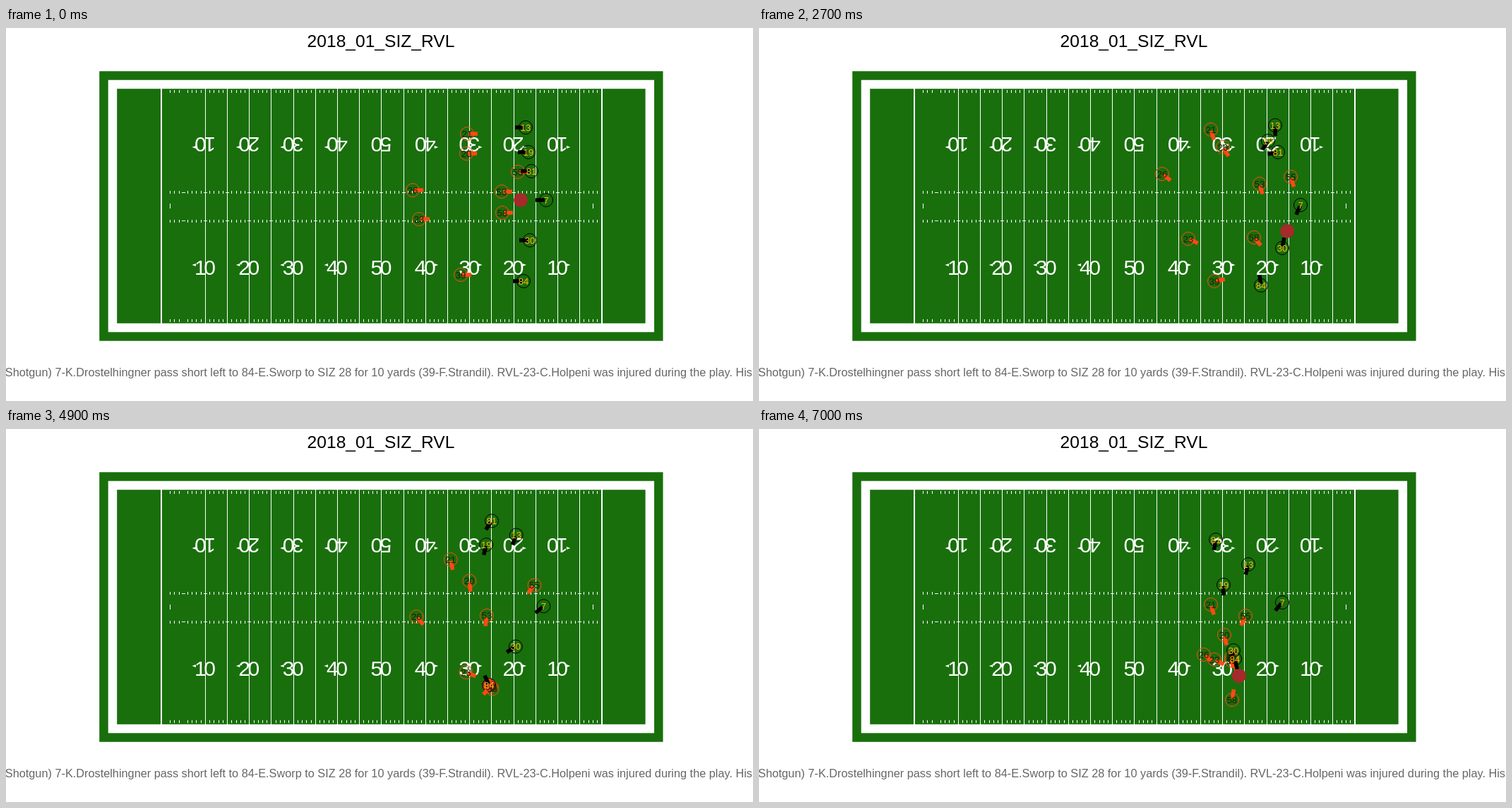
An HTML page with a canvas that plays this animation: 1058 by 529 pixels, repeating every 7100 ms.

```html
<!DOCTYPE html>
<html lang="en">
<head>
<meta charset="utf-8">
<title>Play animation</title>
<style>
  html, body { margin: 0; width: 100%; height: 100%; overflow: hidden; background: #fff; }
  canvas { display: block; width: 100vw; height: 100vh; }
</style>
</head>
<body>
<canvas id="stage" width="1058" height="529"></canvas>
<script>
const ctx = document.getElementById('stage').getContext('2d');
const LOOP = 7100, STEP = 100;
const SNAP = 1000, CAUGHT_SNAP = 1600, THROW = 2300, CATCH = 3500, DOWN = 5700;
const KEYS = [SNAP, 2700, 4400, 7000];
const YARD = 6.2367, LEFT = 157.2, TOP = 86.2, RIGHT = 905.6, BOTTOM = 418.8;
const FONT = 'Arial, "Liberation Sans", sans-serif';
const GREEN = '#196f0c';
const AWAY = { line: '#000', ink: '#ffb612', ahead: -1 };
const HOME = { line: '#ff4a12', ink: '#2a1c00', ahead: 1 };

const fieldX = yd => LEFT + yd * YARD;
const mix = (a, b, k) => a.map((v, i) => v + (b[i] - v) * k);
const ramp = (t, t0, t1) => Math.min(1, Math.max(0, (t - t0) / (t1 - t0)));

// Smooth curve through points at uneven times, starting from rest.
function curve(ts, vs) {
  const last = ts.length - 1;
  const slope = vs.map((v, i) => {
    const a = Math.max(0, i - 1), b = Math.min(last, i + 1);
    return i ? (vs[b] - vs[a]) / (ts[b] - ts[a]) : 0;
  });
  return t => {
    if (t <= ts[0]) return vs[0];
    if (t >= ts[last]) return vs[last];
    const i = ts.findIndex((v, k) => t < ts[k + 1]);
    const d = ts[i + 1] - ts[i], u = (t - ts[i]) / d, w = 1 - u;
    return w * w * ((1 + 2 * u) * vs[i] + u * d * slope[i]) +
           u * u * ((3 - 2 * u) * vs[i + 1] - w * d * slope[i + 1]);
  };
}

// A route: lined up, at the throw, after the catch, at the whistle.
function player(num, team, ...route) {
  const x = curve(KEYS, route.map(p => p[0]));
  const y = curve(KEYS, route.map(p => p[1]));
  return { num, team, at: t => [x(t), y(t)] };
}

const passer = player('7', AWAY, [765, 244], [767, 251], [765, 252], [741, 246]);
const catcher = player('84', AWAY, [733, 359], [711, 365], [688, 369], [674, 326]);
const players = [
  player('21', HOME, [653, 150], [640, 144], [629, 172], [640, 249]),
  player('20', HOME, [652, 178], [657, 169], [656, 200], [659, 292]),
  player('26', HOME, [576, 230], [571, 207], [573, 253], [630, 320]),
  player('23', HOME, [585, 271], [608, 299], [649, 344], [645, 327]),
  player('39', HOME, [644, 350], [645, 359], [688, 374], [669, 328]),
  player('53', HOME, [702, 232], [709, 221], [685, 252], [669, 324]),
  player('55', HOME, [725, 204], [753, 211], [758, 214], [689, 265]),
  player('58', HOME, [703, 262], [701, 297], [690, 357], [670, 384]),
  player('13', AWAY, [736, 141], [731, 138], [728, 143], [693, 192]),
  player('19', AWAY, [740, 176], [721, 160], [687, 155], [658, 221]),
  player('81', AWAY, [744, 203], [735, 176], [698, 130], [647, 157]),
  passer,
  player('30', AWAY, [742, 301], [741, 312], [731, 308], [672, 314]),
  catcher
];

// Snapped, held, thrown, carried, then left on the ground.
function ballAt(t) {
  if (t < THROW) return mix([729, 244], passer.at(t), ramp(t, SNAP, CAUGHT_SNAP));
  return mix(passer.at(THROW), catcher.at(Math.min(t, DOWN)), ramp(t, THROW, CATCH));
}

// Players line up facing ahead, then turn to the ball and the way they run.
function facing(p, t) {
  const here = p.at(t), ball = ballAt(t);
  const before = p.at(t - STEP), after = p.at(t + STEP);
  const dist = Math.hypot(ball[0] - here[0], ball[1] - here[1]);
  const pull = 5 / Math.max(dist, 20);
  const look = here.map((v, i) => after[i] - before[i] + (ball[i] - v) * pull);
  const [dx, dy] = mix([p.team.ahead * 6, 0], look, ramp(t, SNAP, 2500));
  return Math.atan2(dy, dx);
}

function box(color, x0, y0, x1, y1) {
  ctx.fillStyle = color;
  ctx.fillRect(x0, y0, x1 - x0, y1 - y0);
}

// The field grown by a margin in yards.
function apron(color, yards) {
  const m = yards * YARD;
  box(color, LEFT - m, TOP - m, RIGHT + m, BOTTOM + m);
}

function text(str, x, y, size, color, align = 'center') {
  ctx.font = `${size}px ${FONT}`;
  ctx.textAlign = align;
  ctx.fillStyle = color;
  ctx.fillText(str, x, y);
}

function disc([x, y], r) {
  ctx.beginPath();
  ctx.arc(x, y, r, 0, Math.PI * 2);
}

function vline(yd, y0, y1) {
  const x = Math.round(fieldX(yd));
  box('#fff', x, y0, x + 1, y1);
}

function yardNumber(yd, y, turned) {
  const digits = String(50 - Math.abs(yd - 60));
  const side = Math.sign(yd - 60) * (turned ? -1 : 1);
  ctx.save();
  ctx.translate(fieldX(yd), y);
  if (turned) ctx.rotate(Math.PI);
  text(digits[0], -6.6, 10.8, 30, '#fff');
  text(digits[1], 6.6, 10.8, 30, '#fff');
  if (side) {
    ctx.beginPath();
    ctx.moveTo(side * 18.5, -3);
    ctx.lineTo(side * 13, -5);
    ctx.lineTo(side * 13, -1);
    ctx.fill();
  }
  ctx.restore();
}

function drawField() {
  box('#fff', 0, 0, 1058, 529);
  apron(GREEN, 4);
  apron('#fff', 2);
  apron(GREEN, 0);
  for (let yd = 20; yd <= 105; yd += 5) vline(yd, 86, 419);
  for (const yd of [10, 110]) {
    const x = Math.floor(fieldX(yd));
    box('#fff', x, 86, x + 2, 419);
  }
  for (const yd of [12, 108]) vline(yd, 249, 256);
  for (let yd = 12; yd < 110; yd++) {
    const x = Math.round(fieldX(yd));
    if (yd % 5) {
      for (const y of [88, 231, 272, 413]) vline(yd, y, y + 4);
    } else {
      for (const y of [233, 273]) box('#fff', x - 2, y, x + 3, y + 1);
    }
  }
  for (let yd = 20; yd <= 100; yd += 10) {
    yardNumber(yd, 339, false);
    yardNumber(yd, 166, true);
  }
  text('2018_01_SIZ_RVL', 531, 27, 24.6, '#000');
  text('(Shotgun) 7-K.Drostelhingner pass short left to 84-E.Sworp to SIZ 28 for 10 yards ' +
       '(39-F.Strandil). RVL-23-C.Holpeni was injured during the play. His', 1057, 494, 16.3, '#666', 'right');
}

function drawPlayers(t) {
  ctx.lineWidth = 1;
  for (const p of players) {
    disc(p.at(t), 9.5);
    ctx.strokeStyle = p.team.line;
    ctx.stroke();
  }
  for (const p of players) {
    ctx.save();
    ctx.translate(...p.at(t));
    ctx.rotate(facing(p, t));
    box(p.team.line, 2, -2.75, 15, 2.75);
    ctx.restore();
  }
  for (const p of players) {
    const [x, y] = p.at(t);
    text(p.num, x, y + 4.7, 13, p.team.ink);
  }
}

function frame(ms) {
  const t = Math.floor((ms % LOOP) / STEP) * STEP;
  drawField();
  disc(ballAt(t), 10);
  ctx.fillStyle = '#a52a2a';
  ctx.fill();
  drawPlayers(t);
}

const start = performance.now();
function tick() {
  frame(performance.now() - start);
  requestAnimationFrame(tick);
}
tick();
</script>
</body>
</html>
```
